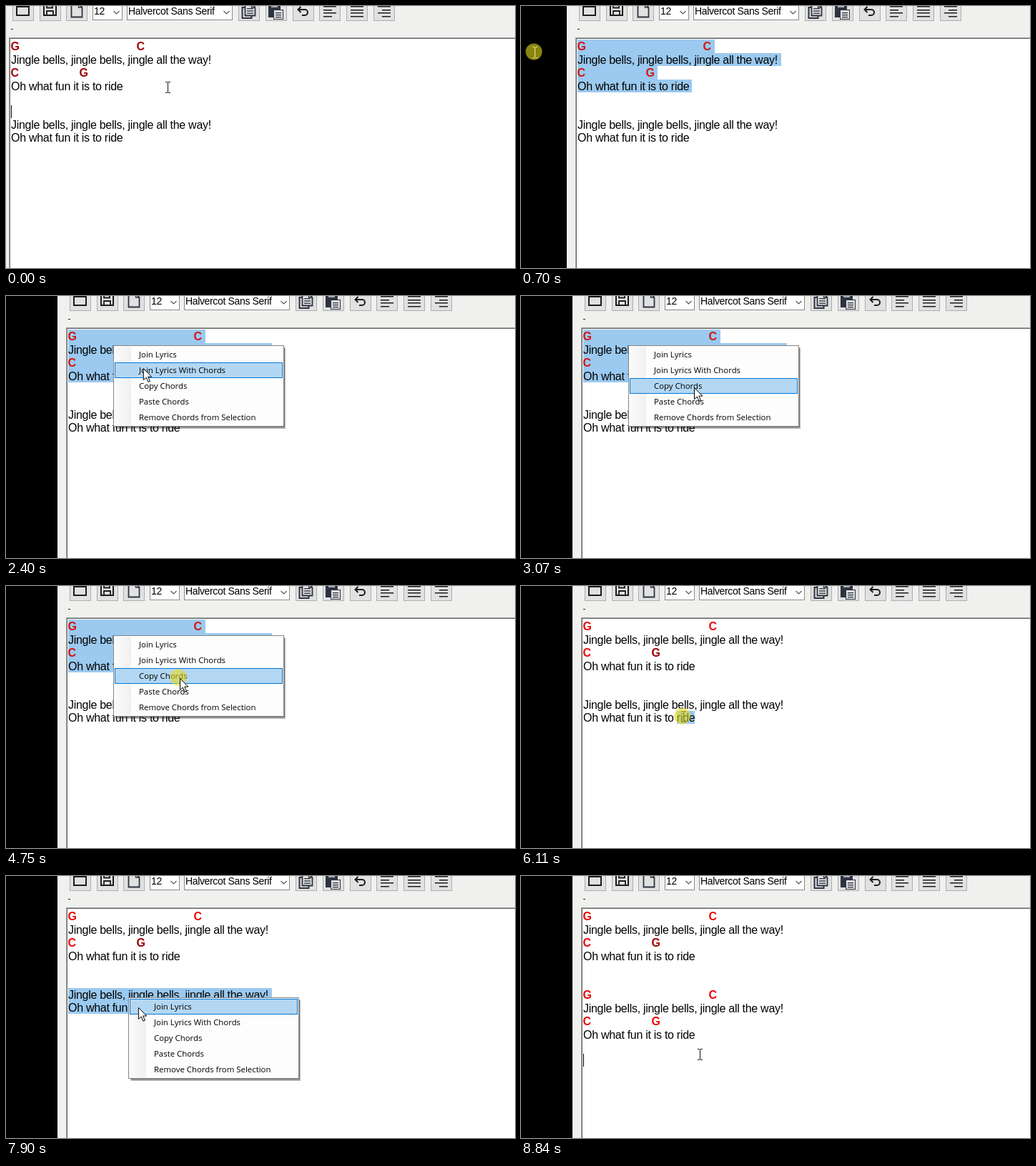
An HTML page with a canvas that plays this animation: 712x367 px, repeating every 9300 ms.

```html
<!DOCTYPE html>
<html lang="en">
<head>
<meta charset="utf-8">
<title>Copying chords between verses</title>
<style>
  html, body { margin: 0; width: 100%; height: 100%; overflow: hidden; background: #000; }
  canvas { display: block; }
</style>
</head>
<body>
<canvas id="stage" width="712" height="367"></canvas>
<script>
const W = 712, H = 367, LOOP = 9300, STEP = 70;
const g = document.getElementById('stage').getContext('2d');

const SANS = '"Liberation Sans", Arial, sans-serif';
const LYRIC = { font: '16px ' + SANS, tracking: '-0.29px' };
const CHORD = { font: 'bold 16px ' + SANS, tracking: '0px' };
const COMBO = { font: '14px ' + SANS, tracking: '-0.35px' };
const MENU = { font: '11.4px "Open Sans", "Noto Sans", sans-serif', tracking: '0px' };
const INK = '#1c1c1c', SLATE = '#2d3340';
const RED = '#ec0606', DARK_RED = '#a00000', SEL_RED = '#d5140e';

// Moments of the story, in ms
const GRAB = 130, RELEASE = 970, REGRAB = 5900, RERELEASE = 6580, PASTE = 8840;

// Pointer moves: start, end, where it arrives
const MOVES = [
  [GRAB, 690, 20, 65], [760, RELEASE, 22, 47], [1040, 1690, 150, 69],
  [2200, 2830, 232, 132], [2830, 3070, 242, 128], [3270, 3340, 243, 129],
  [5280, 5840, 245, 188], [REGRAB, 6180, 227, 183], [6240, RERELEASE, 74, 162],
  [6910, 7330, 171, 170], [7900, 8570, 251, 250]
];
const PRESSES = [[GRAB, 1040], [1630, 1790], [4750, 4880], [REGRAB, 6910], [7330, 7420], [8710, 8770]];
const MENUS = [
  { x: 150, y: 69, from: 1700, to: 4880 },
  { x: 171, y: 170, from: 7340, to: 8770 }
];
const ITEMS = ['Join Lyrics', 'Join Lyrics With Chords', 'Copy Chords', 'Paste Chords', 'Remove Chords from Selection'];

const VERSE = [
  { chords: [[0, 'G'], [176, 'C']], end: 192, y: 0 },
  { text: 'Jingle bells, jingle bells, jingle all the way!', end: 285, y: 19 },
  { chords: [[0, 'C'], [96, 'G']], end: 112, y: 37 },
  { text: 'Oh what fun it is to ride', end: 160, y: 56 }
];
const place = (lines, top) => lines.map(l => ({ ...l, y: top + l.y }));
const FIRST = place(VERSE, 47);
const PASTED = place(VERSE, 157);
const PLAIN = [{ ...VERSE[1], y: 157 }, { ...VERSE[3], y: 175, end: 156 }];

const during = (t, a, b) => t >= a && t < b;
const mix = (a, b, p) => a + (b - a) * p;

function progress(t, a, b) {
  if (t < a) return 0;
  if (t >= b) return 1;
  const steps = Math.round((b - a) / STEP) + 1;
  const p = Math.min(1, (Math.floor((t - a) / STEP) + 1) / steps);
  return 1 - (1 - p) ** 2;
}

function pointerAt(t) {
  let x = 227, y = 114;
  for (const [a, b, toX, toY] of MOVES) {
    const p = progress(t, a, b);
    x = mix(x, toX, p);
    y = mix(y, toY, p);
  }
  return [x, y];
}

function rect(x, y, w, h, fill) {
  g.fillStyle = fill;
  g.fillRect(x, y, w, h);
}
function box(x, y, w, h, fill, edge) {
  rect(x, y, w, h, edge);
  rect(x + 1, y + 1, w - 2, h - 2, fill);
}
function setFont({ font, tracking }) {
  g.font = font;
  g.letterSpacing = tracking;
}
function text(s, x, y, style, fill = '#000') {
  setFont(style);
  g.fillStyle = fill;
  g.fillText(s, x, y);
}
function line(points, width, color = INK) {
  g.beginPath();
  points.forEach(([x, y]) => g.lineTo(x, y));
  g.lineWidth = width;
  g.strokeStyle = color;
  g.stroke();
}

function combo(x, w, label) {
  box(x, -4, w, 24, '#fff', '#8a8a8a');
  text(label, x + 2, 12, COMBO);
  const c = x + w - 8.5;
  line([[c - 4, 7], [c, 11], [c + 4, 7]], 1.1, '#555');
}

// Page with a folded right corner, its top edge hidden above the window
function page(x, w, bottom, color) {
  const r = x + w;
  line([[x, -4], [x, bottom], [r, bottom], [r, 2], [r - 5, -3]], 1.8, color);
  line([[r - 5, -3], [r - 5, 2], [r, 2]], 1.3, color);
}
function rules(x, y, w, gap) {
  for (let i = 0; i < 3; i++) rect(x, y + i * gap, w, 1.3, SLATE);
}
function paragraph(x, indent, flushRight) {
  for (let i = 0; i < 4; i++) {
    const cut = i % 2 * indent;
    rect(x + (flushRight ? cut : 0), Math.round(i * 4.6), 18 - cut, 1.5, INK);
  }
}

function toolbar() {
  for (let i = 0; i < 9; i++) {
    const x = i < 3 ? 9 + 37.6 * i : 325 + 37.8 * (i - 3);
    box(Math.round(x), -9, 30, 30, '#e1e1e1', '#adadad');
  }
  combo(121, 42, '12');
  combo(169, 148, 'Halvercot Sans Serif');

  line([[15, -4], [15, 13], [32, 13], [32, -4]], 2);
  rect(14, 0, 18, 2, INK);

  line([[53, -4], [53, 13], [70, 13], [70, -4]], 2);
  line([[57, 13], [57, 7], [66, 7], [66, 13]], 1.8);
  line([[57, -2], [57, 2.5], [65, 2.5], [65, -2]], 1.8);

  page(91.5, 15, 15.5, SLATE);

  line([[334, 2], [330.5, 2], [330.5, 17], [343.5, 17], [343.5, 14]], 2, SLATE);
  page(334.5, 14, 13.5, SLATE);
  rules(337, 3, 9, 3.3);

  rect(367, -4, 17, 20, SLATE);
  rect(371, 0, 9, 2, '#aab0b6');
  box(374, 5, 14, 14, '#e1e1e1', SLATE);
  rules(377, 9, 8, 3);

  g.beginPath();
  g.moveTo(409, 5);
  g.arc(418, 9, 4, -Math.PI / 2, Math.PI / 2);
  g.lineTo(414, 13);
  g.lineWidth = 2;
  g.strokeStyle = INK;
  g.stroke();
  line([[412.5, 1], [408.5, 5], [412.5, 9]], 2);

  paragraph(444, 6);
  paragraph(482, 0);
  paragraph(520, 6, true);
  rect(7, 32, 3, 1, '#222');
}

function wordStarts(l) {
  if (l.chords) return l.chords.map(c => c[0]);
  setFont(LYRIC);
  return l.text.split(' ').map((_, i, words) =>
    g.measureText(words.slice(0, i).join(' ') + (i ? ' ' : '')).width);
}

// Highlights whole words from the pointer to the end of the block
function select(lines, left, [x, y]) {
  lines.forEach((l, i) => {
    const next = i + 1 < lines.length ? lines[i + 1].y : l.y + 18;
    if (next <= y) return;
    let start = 0;
    if (l.y <= y) {
      const dx = x - left;
      if (dx >= l.end) return;
      start = wordStarts(l).filter(s => s <= dx).pop() || 0;
    }
    rect(left + start, l.y, l.end - start, next - l.y, '#9bc9ef');
  });
}

function write(lines, left, color, lastColor = color) {
  for (const l of lines) {
    if (l.text) text(l.text, left, l.y + 15, LYRIC);
    else for (const [x, name] of l.chords)
      text(name, left + x - 0.5, l.y + 15, CHORD, x === 96 ? lastColor : color);
  }
}

function menu({ x, y, from }, t, [px, py]) {
  g.globalAlpha = Math.min(1, (t - from) / 170);
  rect(x + 4, y + 4, 237, 113, 'rgba(0,0,0,.28)');
  rect(x + 3, y + 3, 237, 112.5, 'rgba(0,0,0,.3)');
  box(x, y, 239, 114, '#fdfdfd', '#858585');
  const strip = g.createLinearGradient(x + 1, 0, x + 25, 0);
  strip.addColorStop(0, '#fbfbfb');
  strip.addColorStop(1, '#f0f0f0');
  rect(x + 2, y + 2, 23, 110, strip);
  const hover = px > x + 2 ? Math.floor((py - y - 2) / 22) : -1;
  ITEMS.forEach((item, i) => {
    const top = y + 2 + 22 * i;
    if (i === hover) box(x + 2, top, 235, 22, '#b3d7f3', '#0078d7');
    text(item, x + 36, top + 15, MENU);
  });
  g.globalAlpha = 1;
}

function arrow(x, y) {
  const shape = [[0, 0], [0, 16], [3.8, 12.6], [6.6, 18.8], [9, 17.8], [6.3, 11.6], [11.4, 11.6]];
  g.beginPath();
  shape.forEach(([dx, dy]) => g.lineTo(x + dx + 0.5, y + dy + 0.5));
  g.closePath();
  g.fillStyle = '#fff';
  g.fill();
  g.lineWidth = 1;
  g.strokeStyle = '#000';
  g.stroke();
}

function beam(x, y, color) {
  x = Math.round(x) - 1;
  y = Math.round(y);
  rect(x, y - 7, 1, 14, color);
  for (const dy of [-8, 7]) {
    rect(x - 3, y + dy, 3, 1, color);
    rect(x + 1, y + dy, 3, 1, color);
  }
}

function glow(x, y) {
  g.beginPath();
  g.arc(x - 2, y - 1, 11.5, 0, 7);
  g.fillStyle = 'rgba(230,220,30,.6)';
  g.fill();
}

function draw(t) {
  const cam = Math.round(80 * progress(t, GRAB, RELEASE));
  const left = 7 + cam;
  const pointer = pointerAt(t);
  const pasted = t >= PASTE;

  rect(0, 0, W, H, '#f0f0ef');
  rect(0, 0, cam - 8, H, '#000');
  rect(cam + 4, 44, W, H, '#a0a0a0');
  rect(cam + 5, 45, W, H, '#696969');
  rect(cam + 6, 46, W, H, '#fff');
  g.save();
  g.translate(cam, 0);
  toolbar();
  g.restore();

  if (during(t, GRAB, REGRAB)) select(FIRST, left, pointerAt(Math.min(t, RELEASE)));
  if (during(t, REGRAB, PASTE)) select(PLAIN, left, pointerAt(Math.min(t, RERELEASE)));

  if (t < REGRAB) write(FIRST, left, t < GRAB ? DARK_RED : SEL_RED);
  else write(FIRST, left, RED, DARK_RED);
  write(pasted ? PASTED : PLAIN, left, RED);
  if (t < GRAB) rect(left, 139, 1, 18, '#000');
  if (pasted) rect(left, 249, 1, 18, '#000');

  const open = MENUS.find(m => during(t, m.from, m.to));
  if (open) menu(open, t, pointer);

  const pointing = open || during(t, 1040, 4880);
  const overBlack = pointer[0] < cam - 8;
  if (!pointing) beam(...pointer, overBlack ? '#fff' : '#111');
  if (PRESSES.some(([a, b]) => during(t, a, b))) glow(...pointer);
  if (pointing) arrow(...pointer);
}

function tick() {
  draw(performance.now() % LOOP);
  requestAnimationFrame(tick);
}
tick();
</script>
</body>
</html>
```
